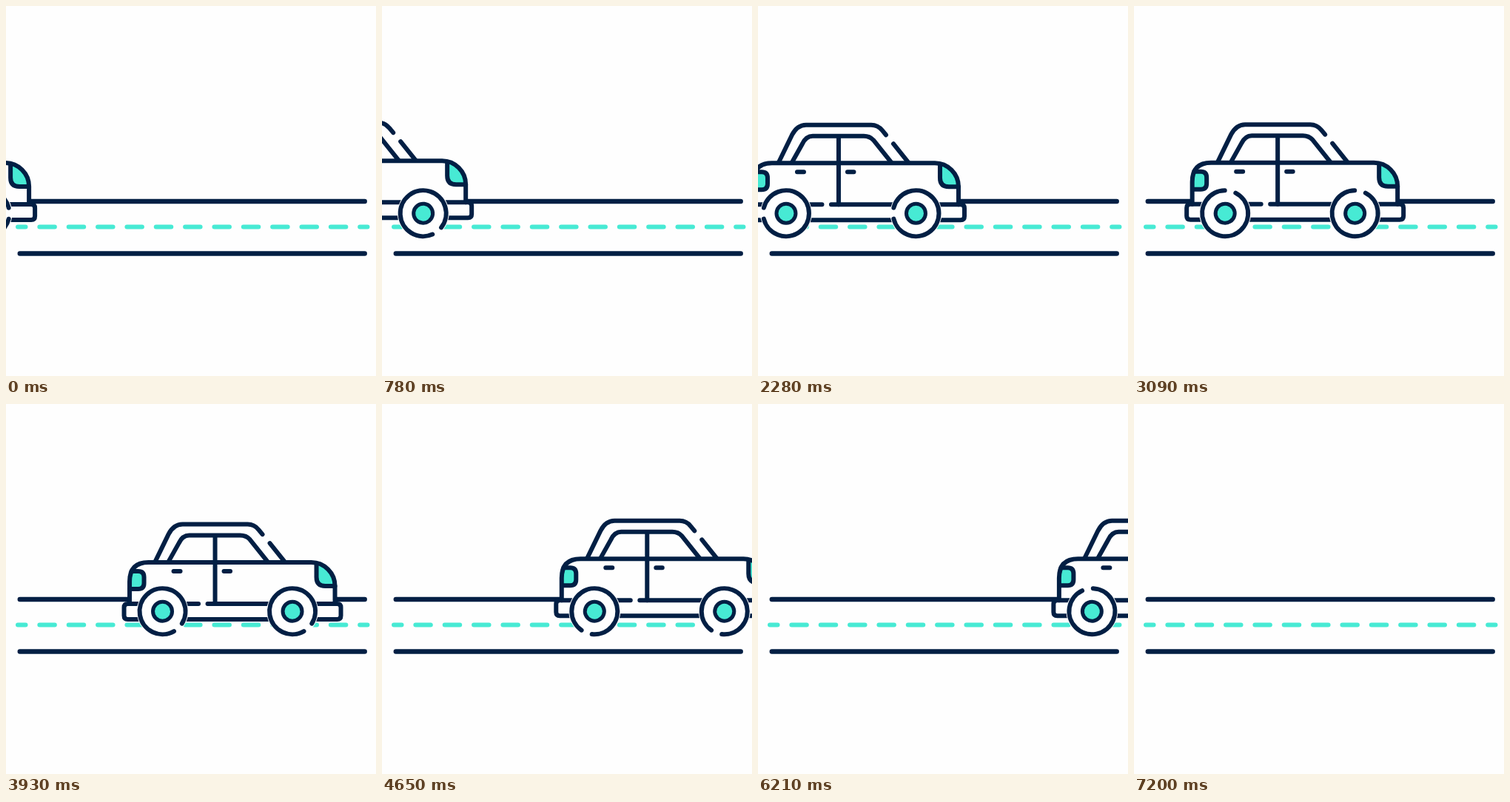
An HTML page that plays this animation: 500x500 px, repeating every 7.23 s.

```html
<!DOCTYPE html>
<html>
<head>
<meta charset="utf-8">
<style>
  html, body { margin: 0; width: 100%; height: 100%; overflow: hidden; background: #fefefe; }
  svg { display: block; width: 100vw; height: 100vh; }
  .line { fill: none; stroke: #021f44; stroke-width: 6; stroke-linecap: round; stroke-linejoin: round; }
  .paint { fill: #fefefe; }
  .glow { fill: #47ead4; }
</style>
</head>
<body>
<svg viewBox="0 0 500 500">
  <defs>
    <g id="wheel">
      <circle class="paint" r="35"/>
      <!-- ring with a 28 degree gap facing right -->
      <path class="line" stroke-width="6.5" d="M30.08 7.5A31 31 0 1 1 30.08 -7.5"/>
      <circle class="line glow" r="13" style="fill:#47ead4;stroke-width:5"/>
    </g>
  </defs>

  <g class="line" style="stroke-width:6.5">
    <path d="M18.8 264H484.7M18.8 334.5H484.7"/>
    <path d="M16 298.5H488.5" stroke="#47ead4" style="stroke:#47ead4;stroke-width:6"
          stroke-dasharray="20.5 18.85" stroke-dashoffset="10"/>
  </g>

  <g id="car">
    <g id="body">
      <path class="paint" d="M78.5 268V238Q78.5 212 104 212H112L131 174Q138 160.5 150 160.5H238
        Q247 160.5 253 168L288 212H324A32 32 0 0 1 356 244V268H364V289H71V268Z"/>
      <path class="glow" d="M79 224H90Q98 224 98 232V240Q98 248 90 248H79Z
        M331 213V232Q331 244 343 244H356A32 32 0 0 0 331 213Z"/>
      <g class="line">
        <path d="M78.5 268V238Q78.5 212 104 212H324A32 32 0 0 1 356 244V268"/>
        <path d="M113 211L131 174Q138 160.5 150 160.5H238Q247 160.5 253 168L258 174M268 186L288 211"/>
        <path d="M131 211L145 186Q150 175.5 159 175.5H228Q236 175.5 241 181L265 211M194 176V268"/>
        <path d="M81 224H90Q98 224 98 232V240Q98 248 90 248H79M331 214V232Q331 244 343 244H356"/>
        <path d="M138 224H147M206 224H214.5"/>
        <path d="M92 268H76Q71 268 71 273V284Q71 289 76 289H92"/>
        <path d="M330 268H359Q364 268 364 273V284Q364 289 359 289H330"/>
        <path d="M150 268H171.5M184 268H268M150 289H268"/>
      </g>
    </g>
    <use class="spin" href="#wheel" data-x="123"/>
    <use class="spin" href="#wheel" data-x="298.5"/>
  </g>
</svg>
<script>
  const LOOP = 7230, SPEED = 0.1052, START = -325;
  const car = document.getElementById('car');
  const body = document.getElementById('body');
  const wheels = document.querySelectorAll('.spin');

  // wheel angle in degrees at given times
  const turns = [[0, 0], [1470, 98], [2280, 180], [3090, 283], [3930, 406], [5400, 538], [LOOP, 720]];

  function angle(t) {
    const i = turns.findIndex(([time]) => time > t);
    const [t0, a0] = turns[i - 1], [t1, a1] = turns[i];
    return a0 + (a1 - a0) * (t - t0) / (t1 - t0);
  }

  // eight eased half-swings per loop; the first one starts from rest
  function bob(t) {
    const k = t / LOOP * 8, wave = Math.cos(Math.PI * k);
    return k < 1 ? 1.5 * (wave - 1) : 0.5 + 3.5 * wave;
  }

  function draw(now) {
    const t = now % LOOP;
    car.setAttribute('transform', `translate(${START + SPEED * t} 0)`);
    body.setAttribute('transform', `translate(0 ${bob(t)})`);
    for (const w of wheels)
      w.setAttribute('transform', `translate(${w.dataset.x} 280.2) rotate(${angle(t)})`);
  }

  const begin = performance.now();
  function tick() {
    draw(performance.now() - begin);
    requestAnimationFrame(tick);
  }
  tick();
</script>
</body>
</html>
```
